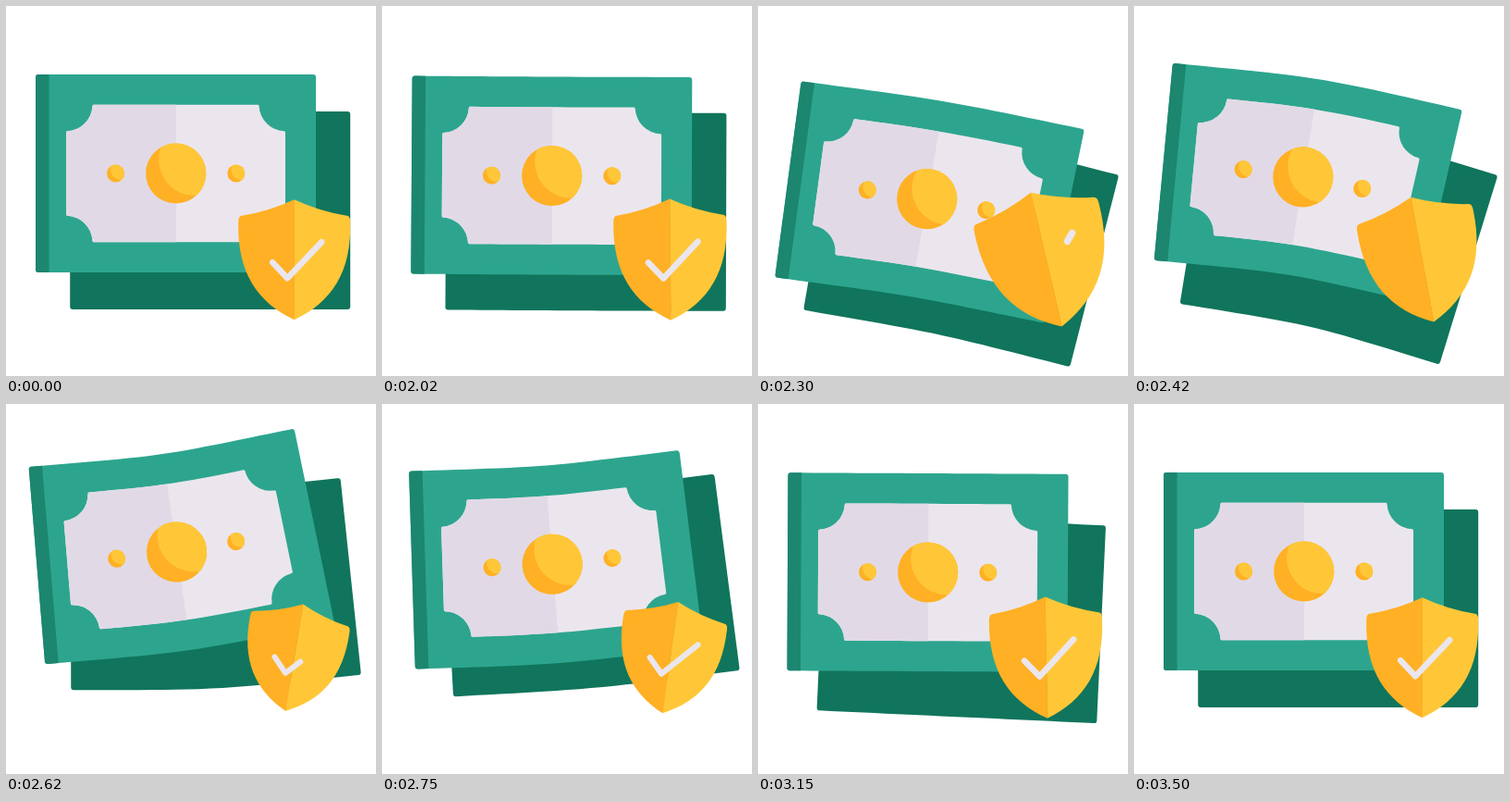
Write an HTML page with a canvas that moves like this. It is 400x400 px and loops after 3520 ms.

```html
<!DOCTYPE html>
<html lang="en">
<head>
<meta charset="utf-8">
<title>Protected money</title>
<style>
  html, body { margin: 0; width: 100%; height: 100%; overflow: hidden; background: #fff; }
  canvas { display: block; width: 400px; height: 400px; }
</style>
</head>
<body>
<canvas id="stage" width="400" height="400"></canvas>
<script>
const ctx = document.getElementById('stage').getContext('2d');
const LOOP = 3520, START = 2020;
const HALF_W = 151.5, HALF_H = 107;
const GOLD = '#ffb024', LIGHT_GOLD = '#ffc738';
const PAPER = '#ebe6ed', PAPER_SHADE = '#e1dae6';

// Everything rests at zero on the first and last beat.
const BEATS = [2000, 2150, 2420, 2620, 2900, 3120, 3500];
const swing = (...values) => [0, ...values, 0];

// lift in px, tilt and curl in degrees, drift in px per degree of tilt.
const front = {
  x: 183.5, y: 181, drift: -0.1,
  lift: swing(47.5, 4, -21, 10.5, 1.5),
  tilt: swing(6, 9.2, -8.2, 2.5, 0.4),
  curl: swing(-3, 7.6, -7, -0.8, 0)
};
const back = {
  x: 220.7, y: 221, drift: -0.35,
  lift: swing(27, 22, -20.5, -11.5, 10),
  tilt: swing(6.4, 13.2, -3, -4.2, 2.5),
  curl: swing(-2.5, 8, -6, 0, 0)
};
const shield = {
  x: 311.7, y: 274.2,
  growth: swing(0.2, 0.055, -0.1, 0, 0.01),
  tilt: swing(-11, -10.5, 9.3, 2.6, -1)
};

const radians = degrees => degrees * Math.PI / 180;

const smooth = s => {
  s = Math.min(1, Math.max(0, s));
  return s * s * (3 - 2 * s);
};

// Smooth curve through the beat values, at rest at both ends.
function valueAt(values, t) {
  const last = BEATS.length - 1;
  if (t < START || t >= BEATS[last]) return 0;
  let i = 0;
  while (t >= BEATS[i + 1]) i++;
  const span = BEATS[i + 1] - BEATS[i], s = (t - BEATS[i]) / span;
  const slope = k => k === 0 || k === last ? 0 :
    (values[k + 1] - values[k - 1]) / (BEATS[k + 1] - BEATS[k - 1]) * span;
  return values[i] + (values[i + 1] - values[i]) * smooth(s) +
    slope(i) * s * (1 - s) ** 2 - slope(i + 1) * s * s * (1 - s);
}

function billPose(bill, t) {
  const degrees = valueAt(bill.tilt, t);
  return {
    x: bill.x + bill.drift * degrees,
    y: bill.y + valueAt(bill.lift, t),
    tilt: radians(degrees),
    curl: radians(valueAt(bill.curl, t))
  };
}

// The bill is a strip whose tilt changes along its length, mostly near the middle.
function bend({ x: cx, y: cy, tilt, curl }, x, y) {
  const s = 3 * x / HALF_W;
  const sag = curl / 2 * HALF_W / 3 * Math.log(Math.cosh(s));
  const angle = tilt + curl / 2 * Math.tanh(s);
  return [
    cx + x * Math.cos(tilt) - sag * Math.sin(tilt) - y * Math.sin(angle),
    cy + x * Math.sin(tilt) + sag * Math.cos(tilt) + y * Math.cos(angle)
  ];
}

function trace(pose, points) {
  ctx.beginPath();
  points.forEach(([x, y], i) => {
    const [nx, ny] = points[(i + 1) % points.length];
    const steps = Math.ceil(Math.hypot(nx - x, ny - y) / 12);
    for (let k = 0; k < steps; k++) {
      ctx.lineTo(...bend(pose, x + (nx - x) * k / steps, y + (ny - y) * k / steps));
    }
  });
  ctx.closePath();
}

const box = (left, top, right, bottom) =>
  [[left, top], [right, top], [right, bottom], [left, bottom]];

function notchedPlate(halfW, halfH, radius) {
  return box(-halfW, -halfH, halfW, halfH).flatMap(([x, y], i) =>
    Array.from({ length: 9 }, (_, k) => {
      const a = (i + 1) * Math.PI / 2 - 0.05 - k / 8 * (Math.PI / 2 - 0.1);
      return [x + radius * Math.cos(a), y + radius * Math.sin(a)];
    }));
}

const BILL = box(3 - HALF_W, 3 - HALF_H, HALF_W - 3, HALF_H - 3);
const PLATE = notchedPlate(118.5, 74.2, 30);

function roundFill(pose, points, color, border) {
  trace(pose, points);
  ctx.fillStyle = ctx.strokeStyle = color;
  ctx.lineWidth = border;
  ctx.lineJoin = 'round';
  ctx.fill();
  ctx.stroke();
}

// Repaints the part of a shape left of the given x.
function shadeLeft(pose, x, points, color, border) {
  ctx.save();
  trace(pose, box(-HALF_W - 20, -HALF_H - 20, x, HALF_H + 20));
  ctx.clip();
  roundFill(pose, points, color, border);
  ctx.restore();
}

function disc(x, y, r, color) {
  ctx.beginPath();
  ctx.arc(x, y, r, 0, Math.PI * 2);
  ctx.fillStyle = color;
  ctx.fill();
}

function coin(pose, x, r) {
  ctx.save();
  ctx.translate(...bend(pose, x, 0));
  ctx.rotate(pose.tilt);
  disc(0, 0, r, GOLD);
  ctx.clip();
  disc(r * 0.63, -r * 0.46, r * 1.2, LIGHT_GOLD);
  ctx.restore();
}

function drawFront(t) {
  const pose = billPose(front, t);
  roundFill(pose, BILL, '#2da58e', 6);
  shadeLeft(pose, 14.5 - HALF_W, BILL, '#1c866f', 6);
  roundFill(pose, PLATE, PAPER, 3);
  shadeLeft(pose, 0.5, PLATE, PAPER_SHADE, 3);
  coin(pose, 0.2, 32.6);
  coin(pose, -65, 9.5);
  coin(pose, 65.3, 9.5);
}

function shieldHalf(side, color) {
  ctx.beginPath();
  ctx.moveTo(0, -65);
  ctx.quadraticCurveTo(28 * side, -52, 57 * side, -47.5);
  ctx.quadraticCurveTo(60.5 * side, -47, 60.5 * side, -41);
  ctx.bezierCurveTo(62 * side, 14, 40 * side, 46, 0, 65);
  ctx.closePath();
  ctx.fillStyle = color;
  ctx.fill();
}

// The tick is wiped away from its start, then written again.
function drawCheck(t) {
  const length = 77.1;
  const from = t < 2420 ? smooth((t - 2120) / 230) : 0;
  const to = t < 2420 ? 1 : smooth((t - 2480) / 250);
  if (to - from < 0.001) return;
  ctx.beginPath();
  ctx.moveTo(-23.5, 3);
  ctx.lineTo(-7.5, 20);
  ctx.lineTo(29.5, -19);
  ctx.setLineDash([(to - from) * length, 500]);
  ctx.lineDashOffset = -from * length;
  ctx.strokeStyle = PAPER;
  ctx.lineWidth = 6.5;
  ctx.lineCap = ctx.lineJoin = 'round';
  ctx.stroke();
}

function drawShield(t) {
  const scale = 1 + valueAt(shield.growth, t);
  ctx.save();
  ctx.translate(shield.x, shield.y);
  ctx.rotate(radians(valueAt(shield.tilt, t)));
  ctx.scale(scale, scale);
  shieldHalf(1, LIGHT_GOLD);
  shieldHalf(-1, GOLD);
  // Covers the seam between the halves.
  ctx.fillRect(-0.5, -64, 0.8, 128);
  drawCheck(t);
  ctx.restore();
}

function frame() {
  const t = performance.now() % LOOP;
  ctx.fillStyle = '#fff';
  ctx.fillRect(0, 0, 400, 400);
  roundFill(billPose(back, t), BILL, '#10755c', 6);
  drawFront(t);
  drawShield(t);
  requestAnimationFrame(frame);
}
frame();
</script>
</body>
</html>
```
